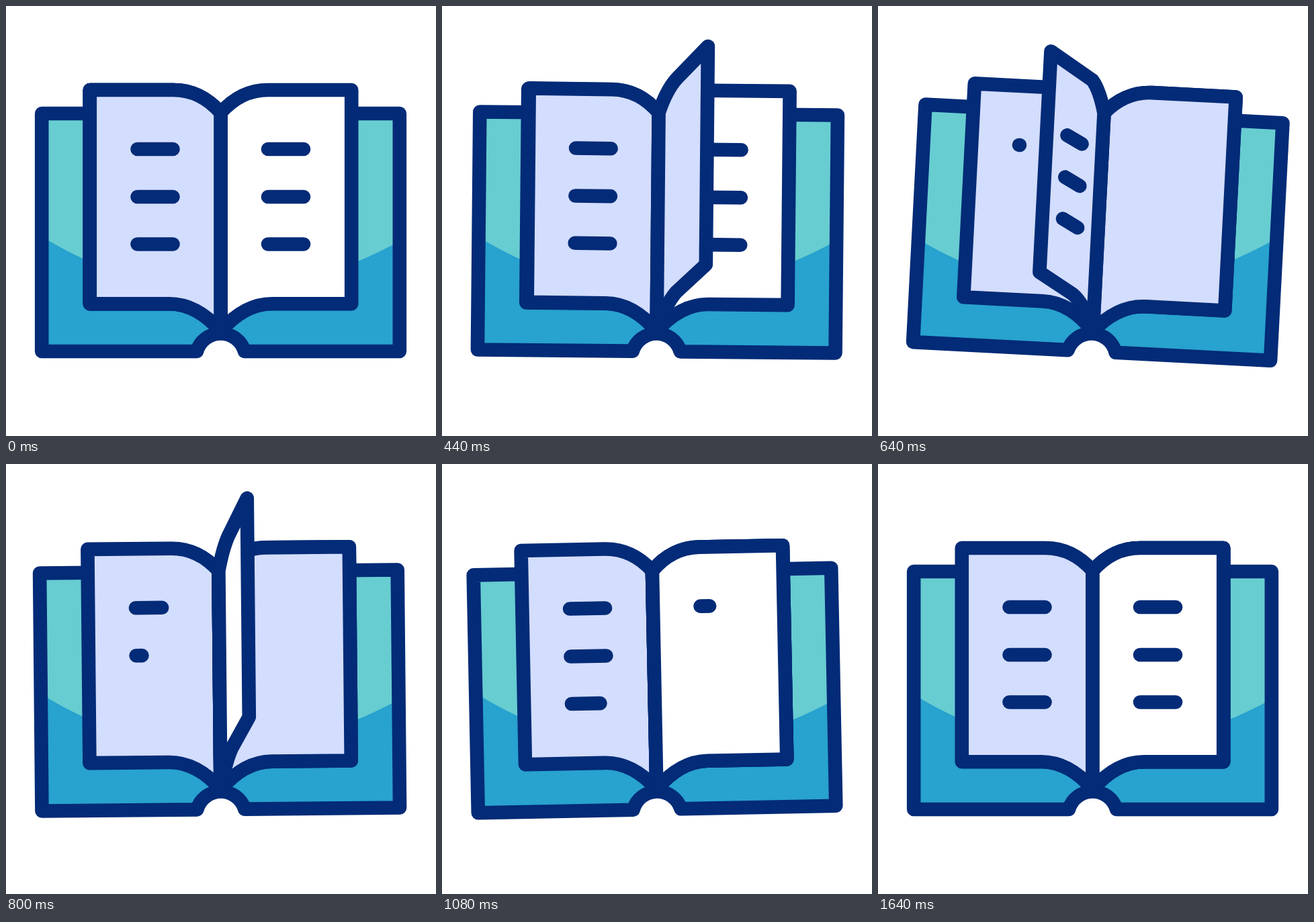
Write an HTML page with a canvas that moves like this. It is 640 by 640 pixels and loops after 2000 ms.

```html
<!DOCTYPE html>
<html>
<head>
<meta charset="utf-8">
<style>
  html, body { margin: 0; width: 100%; height: 100%; overflow: hidden; background: #fff; }
  canvas { display: block; }
</style>
</head>
<body>
<canvas width="640" height="640"></canvas>
<script>
const ctx = document.querySelector('canvas').getContext('2d');
const NAVY = '#032b77', LAVENDER = '#d3ddfd', TEAL = '#67cdd1', BLUE = '#28a2ce', WHITE = '#fff';
const LOOP = 2000, STEP = 40, FLIP_DELAY = 400;
const SPINE = 319.5, PIVOT = 487;
const LINE_Y = [213, 284, 354.5];

const clamp = v => Math.min(1, Math.max(0, v));
const progress = (t, start, length) => clamp((t - start) / length);
const smooth = p => p * p * (3 - 2 * p);
const easeOut = (p, power) => 1 - (1 - p) ** power;

// x is measured from the spine, y from the top of the stage
const cover = new Path2D(
  'M-266.3 160H266.3V514H35.5A37 37 0 0 0 -35.5 514H-266.3Z');
const split = new Path2D('M53 343Q310 500 586 350V640H0V343Z');

function tilt(t) {
  const degrees = 3 * smooth(progress(t, 370, 258))
    - 6 * smooth(progress(t, 628, 307))
    + 3 * smooth(progress(t, 935, 250));
  return degrees * Math.PI / 180;
}

// -1 lies on the left, 0 stands upright, 1 lies on the right
function turn(t) {
  return t < 342
    ? progress(t, 30, 312) ** 1.42 - 1
    : easeOut(progress(t, 342, 295), 1.15);
}

function lift(u) {
  return 79 * (1 - Math.abs(u) ** (u < 0 ? 1.35 : 1.8));
}

function drawPage(u, color) {
  const up = lift(u), low = up * (u < 0 ? 0.8 : 0.9);
  const edge = 194.7 * u;
  const topKnee = 70.5 * Math.sign(u) * Math.abs(u) ** (u < 0 ? 1.5 : 1);
  const lowKnee = 76.5 * u;
  ctx.beginPath();
  ctx.moveTo(0, 159);
  ctx.quadraticCurveTo(topKnee * 0.42, 125, topKnee, 125 - up * 0.26);
  ctx.lineTo(edge, 125 - up);
  ctx.lineTo(edge, 443.3 - low);
  ctx.lineTo(lowKnee, 443.3 - low * 0.3);
  ctx.quadraticCurveTo(lowKnee * 0.46, 443.3, 0, 484);
  ctx.closePath();
  ctx.fillStyle = color;
  ctx.fill();
  ctx.stroke();
}

function drawLine(x1, y1, x2, y2) {
  ctx.beginPath();
  ctx.moveTo(x1, y1);
  ctx.lineTo(x2, y2);
  ctx.stroke();
}

function drawText(x, t, start, stagger, length) {
  LINE_Y.forEach((y, i) => {
    const p = progress(t, start + i * stagger, length);
    if (p > 0) drawLine(x, y, x + 53 * easeOut(p, 1.35) + 0.01, y);
  });
}

function drawFlap(t, back) {
  const u = turn(t), up = lift(u);
  drawPage(u, u > 0 ? back : LAVENDER);
  if (t > 260) return;
  LINE_Y.forEach((y, i) => drawLine(
    124 * u, y - up * (0.34 + 0.16 * i),
    71 * u, y - up * (0.12 + 0.155 * i)));
}

function draw(t) {
  ctx.setTransform(1, 0, 0, 1, 0, 0);
  ctx.fillStyle = WHITE;
  ctx.fillRect(0, 0, 640, 640);
  ctx.translate(SPINE, PIVOT);
  ctx.rotate(tilt(t));
  ctx.translate(0, -PIVOT);
  ctx.strokeStyle = NAVY;
  ctx.lineWidth = 20.6;
  ctx.lineJoin = ctx.lineCap = 'round';

  // the two-tone boundary stays level while the cover tilts
  ctx.fillStyle = TEAL;
  ctx.fill(cover);
  ctx.save();
  ctx.clip(cover);
  ctx.setTransform(1, 0, 0, 1, 0, 0);
  ctx.fillStyle = BLUE;
  ctx.fill(split);
  ctx.restore();
  ctx.stroke(cover);

  drawPage(-1, LAVENDER);
  drawText(-124, t, 636, 131, 260);
  drawPage(1, WHITE);
  if (t < 640) drawText(70.5, 1, 0, 0, 1);

  const flaps = [
    () => drawFlap(t, LAVENDER),
    () => drawFlap(t - FLIP_DELAY, WHITE)
  ];
  if (t < 540) flaps.reverse();
  flaps.forEach(flap => flap());

  drawText(70.5, t, 1008, 133, 365);
}

function frame() {
  const t = performance.now() % LOOP;
  draw(Math.floor(t / STEP) * STEP);
  requestAnimationFrame(frame);
}
frame();
</script>
</body>
</html>
```
